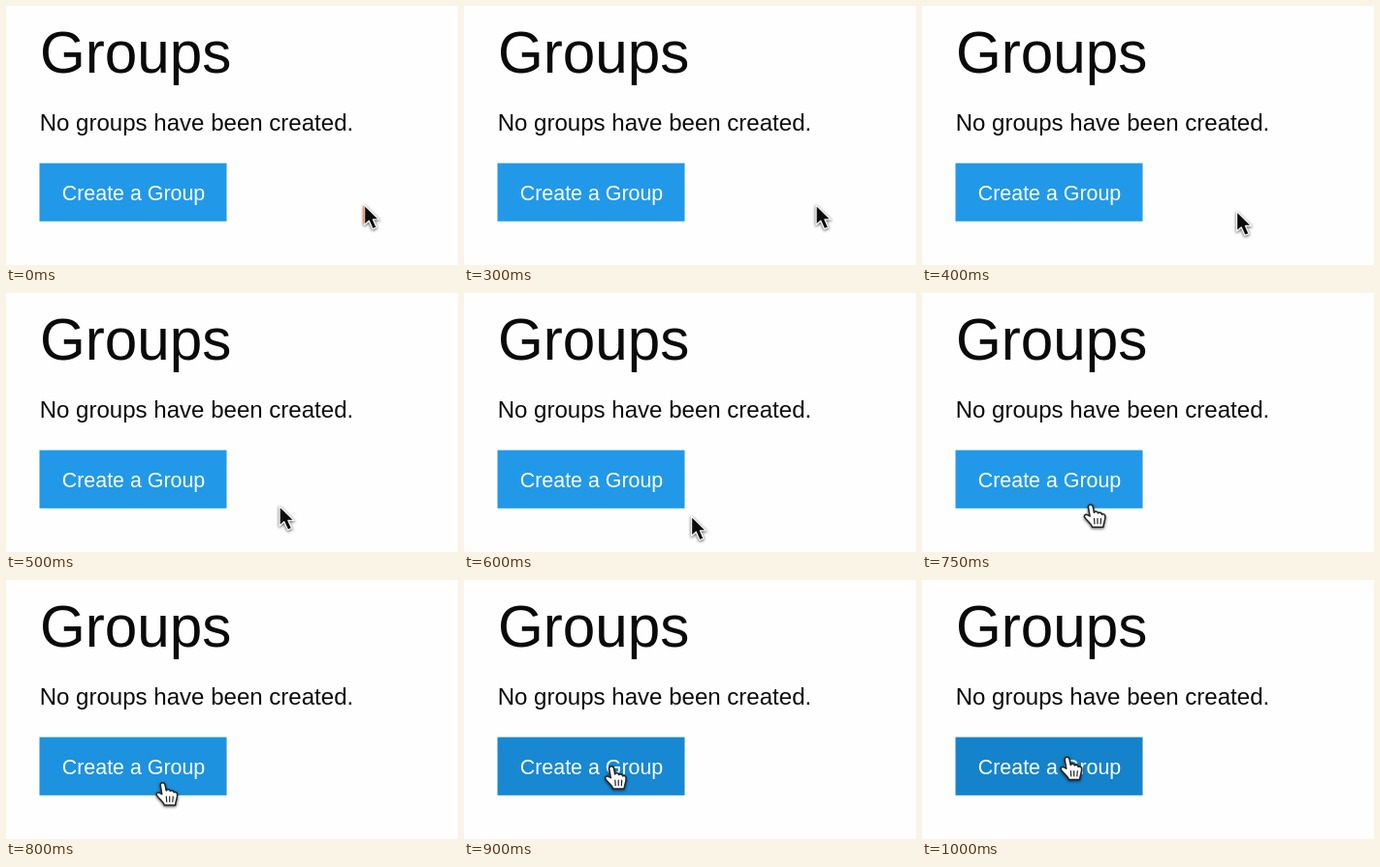
These frames come from a looping animation (466 px wide and 268 px high, 1.9 s). An HTML page:

```html
<!DOCTYPE html>
<html lang="en">
<head>
<meta charset="utf-8">
<title>Create a group</title>
<style>
  html, body { margin: 0; width: 100%; height: 100%; overflow: hidden; background: #fefefe; }
  svg { display: block; }
  text { font-family: "Liberation Sans", Arial, sans-serif; fill: #0a0a0a; }
  #label { fill: #fefefe; }
  .cursor { filter: drop-shadow(0 1px 1.5px rgba(0, 0, 0, .65)); stroke-linejoin: round; stroke-linecap: round; }
</style>
</head>
<body>
<svg width="466" height="268" viewBox="0 0 466 268">
  <text x="35" y="69" font-size="60.2">Groups</text>
  <text x="34.7" y="129" font-size="24.05">No groups have been created.</text>
  <rect id="button" x="34.5" y="162.6" width="193" height="60.2"/>
  <text id="label" x="57.8" y="201" font-size="21.4">Create a Group</text>
  <g id="arrow" class="cursor">
    <path d="M1 1.5V22L5.7 17.8L9.5 26.3L13.6 24.4L10 16.4H16.2Z" fill="#0c0c0c" stroke="#f4f4f4" stroke-width="1.4"/>
    <path id="fringe" d="M.6 3V20" stroke="#f08a4a" stroke-width="1.2"/>
  </g>
  <g id="hand" class="cursor" fill="#fff" stroke="#222" stroke-width="1.5">
    <path d="M-2.8 3C-3.2 -.5 1.4 -.8 2 2.4L3.2 8.4C4 6.7 7 7 7.3 9C8.3 7.8 10.8 8.3 11.2 10.3C13 9.3 14.8 10.8 14.6 13C14.5 17 13 19 12.6 23.4H1.4C.2 19.8 -3.2 18 -6.4 13.6C-8 10.8 -5 8.9 -1.2 12.2Z"/>
    <path d="M3.3 14.5L3.7 20M6.7 14.5V20M10.2 14.5L9.8 20" fill="none" stroke-width="1.2"/>
  </g>
</svg>
<script>
const LOOP = 1900, STEP = 50, LINK_AT = 700, HOVER_AT = 750, FADE = 250;
const [button, arrow, hand, fringe] =
  ["button", "arrow", "hand", "fringe"].map(id => document.getElementById(id));

// key poses of the pointer tip: time, x, y
const keys = [
  [250, 368.5, 204.5], [300, 362, 204.5], [500, 281, 219], [600, 233.5, 229.5],
  [700, 192, 227], [800, 162, 209.5], [1000, 150, 183]
];
const normal = [33, 153, 232], hover = [21, 131, 204];
const clamp = v => Math.min(1, Math.max(0, v));

// speed through key i along one axis, at rest at both ends
function slope(i, axis) {
  const a = keys[i - 1], b = keys[i + 1];
  return a && b ? (b[axis] - a[axis]) / (b[0] - a[0]) : 0;
}

// smooth cubic curve through the key poses
function along(t, axis) {
  const next = keys.findIndex(k => k[0] >= t);
  const i = next < 0 ? keys.length - 2 : Math.max(0, next - 1);
  const a = keys[i], b = keys[i + 1], span = b[0] - a[0];
  const u = clamp((t - a[0]) / span), v = 1 - u;
  return a[axis] * v * v * (1 + 2 * u) + b[axis] * u * u * (1 + 2 * v)
    + span * u * v * (slope(i, axis) * v - slope(i + 1, axis) * u);
}

const show = (node, on) => node.style.display = on ? "" : "none";

function draw(now) {
  const t = Math.floor(now % LOOP / STEP) * STEP;
  const place = `translate(${along(t, 1)} ${along(t, 2)})`;
  for (const g of [arrow, hand]) g.setAttribute("transform", place);
  show(arrow, t < LINK_AT);
  show(hand, t >= LINK_AT);
  show(fringe, t < keys[1][0]);

  const k = 1 - (1 - clamp((t - HOVER_AT) / FADE)) ** 1.7;
  button.setAttribute("fill", `rgb(${normal.map((c, i) => Math.round(c + (hover[i] - c) * k))})`);
}

const start = performance.now();
function tick() {
  draw(performance.now() - start);
  requestAnimationFrame(tick);
}
tick();
</script>
</body>
</html>
```
